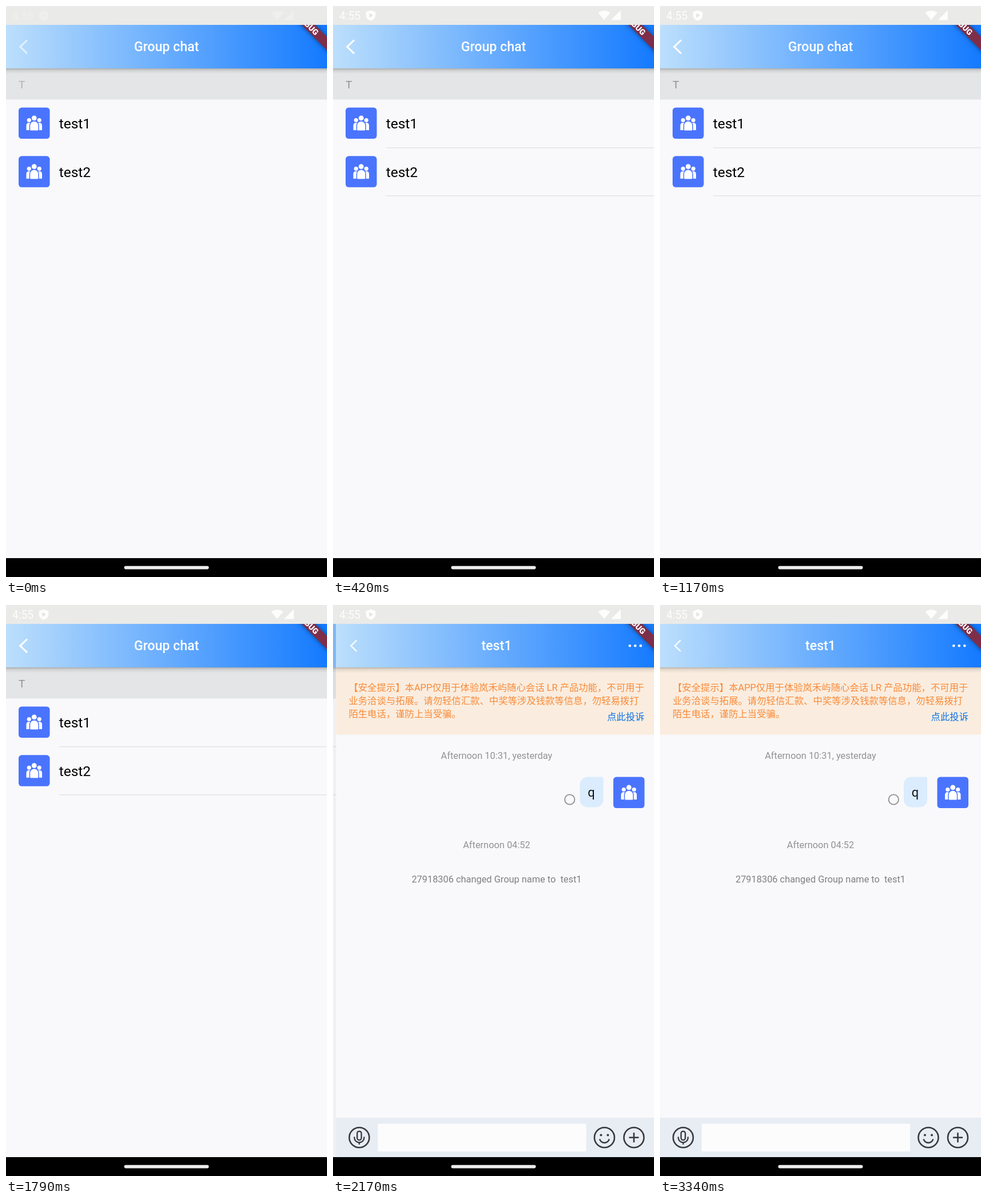
Animation of 561 by 998 pixels, one loop 3.39 s. Source, as an HTML page with a canvas:

```html
<!DOCTYPE html>
<html lang="zh-CN">
<head>
<meta charset="utf-8">
<title>Group chat</title>
<style>
html, body { margin: 0; width: 561px; height: 998px; overflow: hidden; background: #f9f9fb; }
canvas { display: block; }
</style>
</head>
<body>
<canvas id="stage" width="561" height="998"></canvas>
<script>
const W = 561, H = 998, LOOP = 3390;
const SLIDE_START = 1838, SLIDE_TIME = 400;
const BAR_TOP = 33, BAR_BOTTOM = 109, NAV_TOP = 965;
const FONT = 'Roboto, "Noto Sans CJK SC", "Noto Sans CJK", sans-serif';
const ctx = document.getElementById('stage').getContext('2d');

const clamp = v => Math.max(0, Math.min(1, v));

// Cubic ease with control points (.35, .91) and (.33, .97)
function slideEase(x) {
  if (x <= 0 || x >= 1) return clamp(x);
  const bezier = (a, b, s) => 3 * (1 - s) ** 2 * s * a + 3 * (1 - s) * s * s * b + s ** 3;
  let lo = 0, hi = 1;
  for (let i = 0; i < 24; i++) {
    const mid = (lo + hi) / 2;
    if (bezier(0.35, 0.33, mid) < x) lo = mid; else hi = mid;
  }
  return bezier(0.91, 0.97, lo);
}

function rect(x, y, w, h, color) {
  ctx.fillStyle = color;
  ctx.fillRect(x, y, w, h);
}

function round(x, y, w, h, radius, color) {
  ctx.fillStyle = color;
  ctx.beginPath();
  ctx.roundRect(x, y, w, h, radius);
  ctx.fill();
}

function disc(x, y, r, color) {
  ctx.fillStyle = color;
  ctx.beginPath();
  ctx.arc(x, y, r, 0, Math.PI * 2);
  ctx.fill();
}

function ring(x, y, r, color, width) {
  ctx.strokeStyle = color;
  ctx.lineWidth = width;
  ctx.beginPath();
  ctx.arc(x, y, r, 0, Math.PI * 2);
  ctx.stroke();
}

function stroke(path, color, width, cap = 'butt') {
  ctx.strokeStyle = color;
  ctx.lineWidth = width;
  ctx.lineCap = cap;
  ctx.stroke(new Path2D(path));
}

function fillPath(path, color) {
  ctx.fillStyle = color;
  ctx.fill(new Path2D(path));
}

function text(str, x, y, size, color, align = 'left', weight = 400) {
  ctx.font = `${weight} ${size}px ${FONT}`;
  ctx.textAlign = align;
  ctx.fillStyle = color;
  ctx.fillText(str, x, y);
}

function withAlpha(alpha, draw) {
  ctx.save();
  ctx.globalAlpha *= alpha;
  draw();
  ctx.restore();
}

function header(title) {
  const shade = ctx.createLinearGradient(0, BAR_BOTTOM, 0, BAR_BOTTOM + 10);
  shade.addColorStop(0, 'rgba(0,0,0,.24)');
  shade.addColorStop(0.4, 'rgba(0,0,0,.08)');
  shade.addColorStop(1, 'rgba(0,0,0,0)');
  rect(0, BAR_BOTTOM, W, 10, shade);
  const blue = ctx.createLinearGradient(0, 0, W, 0);
  blue.addColorStop(0, '#bcdffc');
  blue.addColorStop(1, '#147aff');
  rect(0, BAR_TOP, W, BAR_BOTTOM - BAR_TOP, blue);
  text(title, 280.5, 79, 23.18, '#fff', 'center', 500);
}

function avatar(x, y) {
  ctx.save();
  ctx.translate(x, y);
  round(0, 0, 54.5, 54.5, 5.5, '#4a74fd');
  const body = 'M13.5 39.5V31.5Q13.5 26.5 18.5 26.5H20Q18.7 29 18.7 32V39.5Z';
  fillPath(body, '#fff');
  disc(18.3, 22, 3.6, '#fff');
  ctx.save();
  ctx.translate(54.5, 0);
  ctx.scale(-1, 1);
  fillPath(body, '#fff');
  disc(18.3, 22, 3.6, '#fff');
  ctx.restore();
  disc(27.25, 18.4, 4.4, '#fff');
  round(20.2, 24.2, 14.1, 15.8, [7, 7, 1, 1], '#fff');
  ctx.restore();
}

function listPage(reveal) {
  rect(0, 0, W, H, '#f9f9fb');
  rect(0, BAR_BOTTOM, W, 54.5, '#e4e5e6');
  header('Group chat');
  withAlpha(0.6 + 0.4 * reveal, () => {
    stroke('M37 59.5L24.7 71.3L37 83.2', '#fff', 3);
    text('T', 22, 144, 19.1, '#929292');
  });
  ['test1', 'test2'].forEach((name, i) => {
    const y = 177.5 + i * 84.8;
    avatar(22, y);
    text(name, 92.7, y + 36.8, 24.5, '#000');
    withAlpha(reveal, () => rect(93, Math.floor(y + 69.5), W - 93, 1.3, '#e2e2e6'));
  });
}

function inputBar() {
  const ink = '#37393c';
  rect(0, 896, W, 69, '#e8edf4');
  rect(73, 906.5, 364, 48.5, '#fcfcfd');
  for (const x of [40.5, 469, 520.5]) ring(x, 930.7, 17.5, ink, 2.6);
  ctx.strokeStyle = ink;
  ctx.lineWidth = 2.3;
  ctx.beginPath();
  ctx.roundRect(36.8, 919.8, 7.4, 15.4, 3.7);
  ctx.stroke();
  stroke('M32 929.5V931A8.5 8.5 0 0 0 49 931V929.5M40.5 939.5V943', ink, 2.3);
  disc(463, 926.5, 2, ink);
  disc(475, 926.5, 2, ink);
  stroke('M460.5 933.5Q463 940 469 940T477.5 933.5', ink, 2.4);
  stroke('M512 930.7H529M520.5 922.2V939.2', ink, 2.6);
}

function chatPage() {
  const small = 16.37, orange = '#f98a38', grey = '#929294';
  rect(0, 0, W, H, '#f9f9fb');
  rect(0, BAR_BOTTOM, W, 117.5, '#faeddf');
  header('test1');
  stroke('M36 61.5L26 71.2L36 81', '#fff', 2.3);
  for (const x of [513.3, 522.8, 532.3]) disc(x, 71.2, 2.3, '#fff');

  [
    '【安全提示】本APP仅用于体验岚禾屿随心会话 LR 产品功能，不可用于',
    '业务洽谈与拓展。请勿轻信汇款、中奖等涉及钱款等信息，勿轻易拨打',
    '陌生电话，谨防上当受骗。'
  ].forEach((line, i) => text(line, 22, 150.3 + i * 23, small, orange));
  text('点此投诉', 539, 200.8, small, '#0c70e6', 'right');

  text('Afternoon 10:31, yesterday', 280.5, 269, small, grey, 'center');
  ring(408.3, 340, 8.7, '#8e8e8e', 1.8);
  round(426, 300.5, 41, 53, [13.6, 2.7, 13.6, 13.6], '#daecfd');
  text('q', 446, 335, 21.8, '#111', 'center');
  avatar(484.5, 300.5);
  text('Afternoon 04:52', 280.5, 424.5, small, grey, 'center');
  text('27918306 changed Group name to  test1', 280.5, 484.7, small, '#808082', 'center');
  inputBar();
}

function debugRibbon() {
  ctx.save();
  ctx.beginPath();
  ctx.rect(0, BAR_TOP, W, H);
  ctx.clip();
  ctx.translate(W, 0);
  ctx.rotate(Math.PI / 4);
  ctx.shadowColor = 'rgba(0,0,0,.5)';
  ctx.shadowBlur = 8;
  rect(-60, 38.2, 120, 16.4, '#7e2e48');
  ctx.shadowColor = 'transparent';
  text('DEBUG', 0, 51.3, 13.9, '#fff', 'center', 900);
  ctx.restore();
}

function statusBar(reveal) {
  rect(0, 0, W, BAR_TOP, '#eaeae8');
  withAlpha(0.3 + 0.7 * reveal, () => {
    const white = '#fdfdfc';
    text('4:55', 11, 24, 19.3, white);
    fillPath('M66 7.5L74.3 10.5V16.5Q74 23 66 26Q58 23 57.7 16.5V10.5Z', white);
    fillPath('M63.5 12.5L70 16.5L63.5 20.5Z', '#e4e4e2');
    fillPath('M474 24.5L463.5 11.5Q474 4.5 484.5 11.5Z', white);
    fillPath('M486 24.5L503 7.5V24.5Z', white);
  });
}

function draw(t) {
  const reveal = clamp(t / 150);
  const progress = slideEase((t - SLIDE_START) / SLIDE_TIME);
  const chatX = W * (1 - progress);

  if (progress < 1) {
    ctx.save();
    ctx.translate(-W / 3 * progress, 0);
    listPage(reveal);
    ctx.restore();
  }
  if (progress > 0) {
    ctx.save();
    ctx.translate(chatX, 0);
    const edge = ctx.createLinearGradient(-28, 0, 0, 0);
    edge.addColorStop(0, 'rgba(0,0,0,0)');
    edge.addColorStop(1, 'rgba(0,0,0,.04)');
    rect(-28, 0, 28, H, edge);
    chatPage();
    ctx.restore();
  }
  statusBar(reveal);
  debugRibbon();
  rect(0, NAV_TOP, W, H - NAV_TOP, '#000');
  round(206.5, 978.8, 148, 5.6, 2.8, '#ececec');
}

const start = performance.now();
function tick(now) {
  draw(Math.max(0, now - start) % LOOP);
  requestAnimationFrame(tick);
}
draw(0);
requestAnimationFrame(tick);
</script>
</body>
</html>
```
